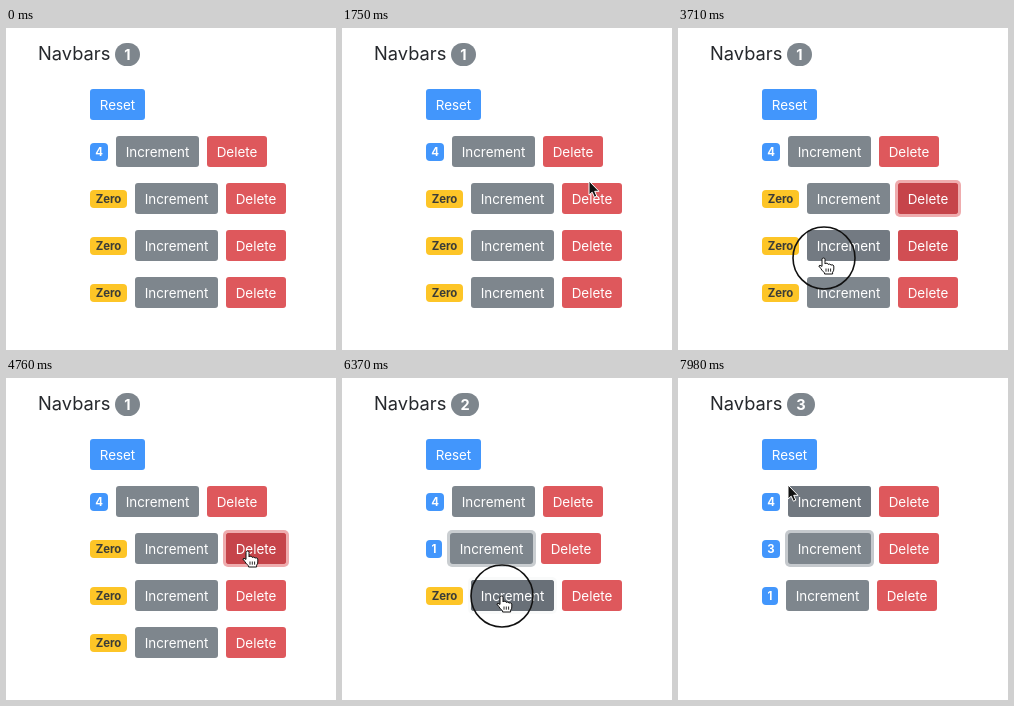
These frames come from a looping animation (330x322 px, 8 s). An HTML page:

```html
<!DOCTYPE html>
<html lang="en">
<head>
<meta charset="utf-8">
<title>Counters</title>
<style>
  html, body { margin: 0; width: 100%; height: 100%; overflow: hidden; background: #fff; }
  svg { display: block; width: 100vw; height: 100vh; }
  text { font-family: Inter, "Liberation Sans", sans-serif; }
</style>
</head>
<body>
<svg id="stage" viewBox="0 0 330 322"></svg>
<script>
const LOOP = 8000, FADE = 150, SHOWN = 1680, REMOVED = 5110;
const GREY = ['#7e868d', '#697078'], RED = ['#de585c', '#c6444a'], BLUE = ['#4296fc', '#2f7fe6'];

// Pointer path: time, x, y
const path = [
  [1680, 245, 150], [1750, 247, 153], [2030, 247, 153], [2500, 243, 173], [2940, 243, 173],
  [3360, 243, 217], [3630, 224, 223], [3710, 146, 230], [3920, 146, 230], [4270, 240, 218],
  [4480, 242, 173], [5200, 242, 173], [5580, 171, 168], [5840, 171, 168], [6260, 160, 218],
  [6560, 160, 218], [6890, 160, 178], [7440, 160, 178], [7965, 110, 107]
];

// Mouse presses: down, up, button
const presses = [
  [2870, 4480, 'del1'], [4970, 5110, 'del1'], [5640, 5740, 'inc1'],
  [6370, 6490, 'inc2'], [7070, 7140, 'inc1'], [7250, 7350, 'inc1']
];

function pointer(t) {
  if (t < SHOWN) return null;
  const i = path.findIndex(p => p[0] > t);
  if (i < 0) return path[path.length - 1].slice(1);
  const [t0, x0, y0] = path[i - 1], [t1, x1, y1] = path[i];
  let k = (t - t0) / (t1 - t0);
  k = k * k * (3 - 2 * k);
  return [x0 + (x1 - x0) * k, y0 + (y1 - y0) * k];
}

const pressed = t => presses.find(p => t >= p[0] && t < p[1]);

function values(t) {
  const v = t < REMOVED ? [4, 0, 0, 0] : [4, 0, 0];
  for (const [, up, id] of presses)
    if (t >= up && id.startsWith('inc')) v[id[3]]++;
  return v;
}

const badgeWidth = n => n === 0 ? 37 : n === 1 ? 16 : 18;

function buttons(t) {
  const list = [{ id: 'reset', x: 84, y: 61, w: 55, label: 'Reset', color: BLUE }];
  values(t).forEach((n, i) => {
    const x = 92 + badgeWidth(n), y = 108 + 47 * i;
    list.push({ id: 'inc' + i, x, y, w: 83, label: 'Increment', color: GREY });
    list.push({ id: 'del' + i, x: x + 91, y, w: 60, label: 'Delete', color: RED });
  });
  return list;
}

function hovered(t) {
  const p = pointer(t);
  const b = p && buttons(t).find(b =>
    p[0] >= b.x && p[0] <= b.x + b.w && p[1] >= b.y && p[1] <= b.y + 31);
  return b ? b.id : '';
}

function focused(t) {
  const last = presses.filter(p => t >= p[0]).pop();
  return !last || (last[2] === 'del1' && t >= REMOVED) ? '' : last[2];
}

// Share of the last FADE ms in which a button had the state
function share(get, id, t) {
  let sum = 0;
  for (let i = 0; i < 10; i++) sum += get(t - FADE * i / 10) === id;
  return sum / 10;
}

const rect = (x, y, w, h, r, fill, opacity = 1) =>
  `<rect x="${x}" y="${y}" width="${w}" height="${h}" rx="${r}" fill="${fill}" opacity="${opacity}"/>`;
const text = (x, y, size, str, fill = '#fff', weight = 400, anchor = 'middle') =>
  `<text x="${x}" y="${y}" font-size="${size}" fill="${fill}" font-weight="${weight}" text-anchor="${anchor}">${str}</text>`;

function drawButton(b, t) {
  const press = pressed(t);
  const dark = press && press[2] === b.id ? 1 : share(hovered, b.id, t);
  const ring = share(focused, b.id, t);
  return (ring ? rect(b.x - 3, b.y - 3, b.w + 6, 37, 5, b.color === RED ? '#efacae' : '#c5c9cd', ring) : '') +
    rect(b.x, b.y, b.w, 31, 3, b.color[0]) +
    (dark ? rect(b.x, b.y, b.w, 31, 3, b.color[1], dark) : '') +
    text(b.x + b.w / 2, b.y + 21, 13.4, b.label);
}

function drawBadge(n, i) {
  const y = 115 + 47 * i, w = badgeWidth(n);
  return rect(84, y, w, 18, 4, n ? BLUE[0] : '#fdc527') +
    text(84 + w / 2, y + 13, 11.4, n || 'Zero', n ? '#fff' : '#3b3c38', 700);
}

function drawPointer(t) {
  const p = pointer(t);
  if (!p) return '';
  const down = pressed(t);
  const hand = `<path d="M-2 1.5Q-2 0-.5 0Q1 0 1 1.5V6Q1.5 5 3 5.2Q4 5.4 4.2 6.4Q6 5.4 7 7Q9.3 6.2 9.8 8V11
    Q9.8 13 8.6 14.2V16H.6V14.8Q-2 13-3.2 10.5L-5.2 8Q-4.6 6.3-2 8.4Z" fill="#fff" stroke="#111"/>
    <path d="M2 10.5v3.2M4.3 10.5v3.2M6.6 10.5v3.2" stroke="#111" stroke-width=".9"/>`;
  const arrow = '<path d="M0 0V14L3.2 11.2L5.4 16.2L7.8 15.2L5.7 10.3H10Z" fill="#111" stroke="#fff"/>';
  return `<g transform="translate(${p})">` +
    (down ? '<circle r="31" fill="none" stroke="#111" stroke-width="1.6"/>' : '') +
    (down || hovered(t) ? hand : arrow) + '</g>';
}

function render(t) {
  const v = values(t), count = v.filter(Boolean).length, w = count === 1 ? 25 : 28;
  stage.innerHTML = rect(0, 0, 330, 322, 0, '#fff') +
    text(32, 32, 18.3, 'Navbars', '#25282c', 400, 'start') +
    rect(109, 15, w, 23, 11.5, GREY[0]) +
    text(109 + w / 2, 32, 14.6, count, '#fff', 700) +
    v.map(drawBadge).join('') +
    buttons(t).map(b => drawButton(b, t)).join('') +
    drawPointer(t);
}

const stage = document.getElementById('stage');
const start = performance.now();
function frame() {
  render((performance.now() - start) % LOOP);
  requestAnimationFrame(frame);
}
frame();
</script>
</body>
</html>
```
